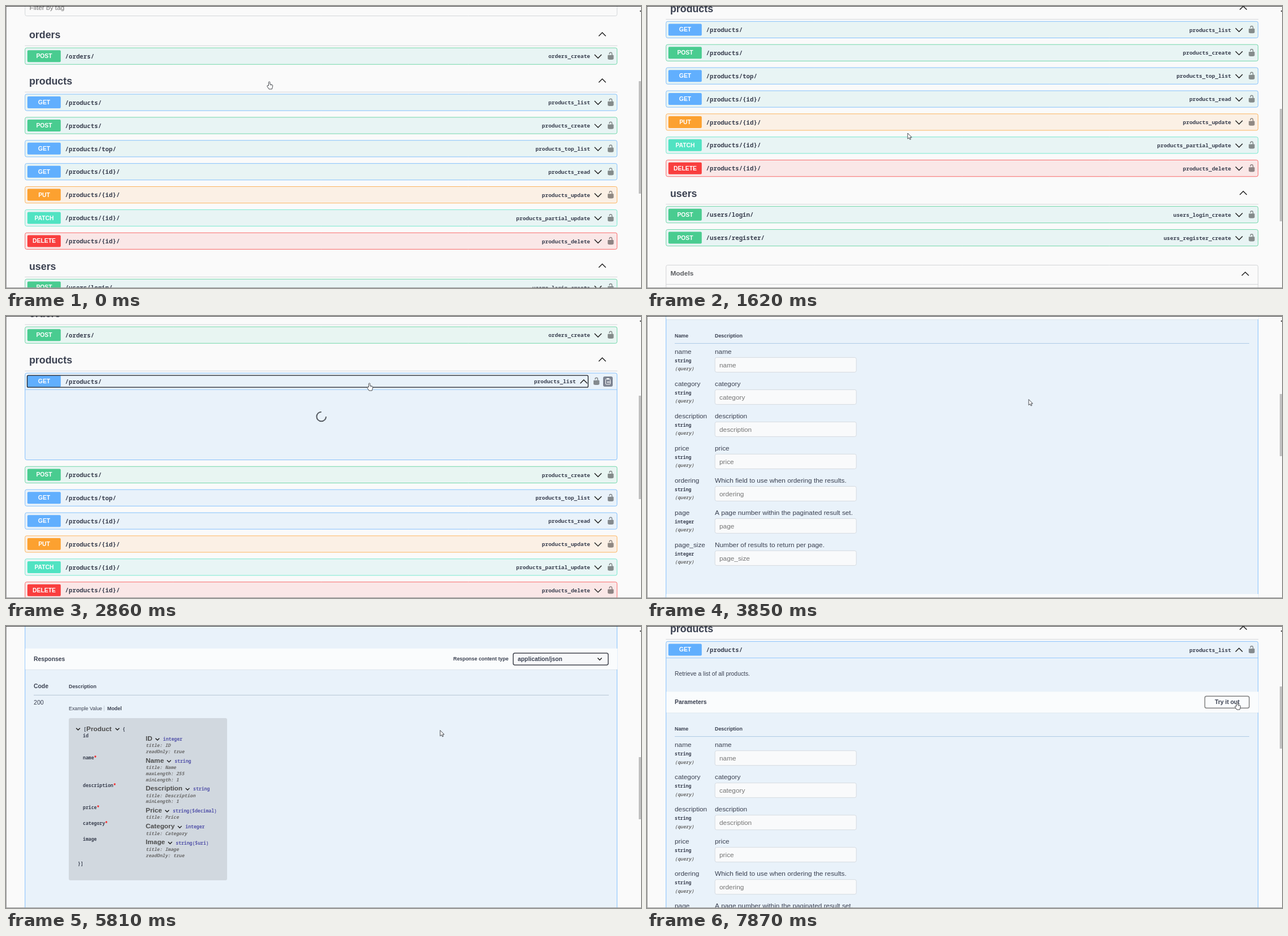
These frames come from a looping animation (1123 px wide and 499 px high, 8 s). An HTML page with a canvas:

```html
<!DOCTYPE html>
<html lang="en">
<head>
<meta charset="utf-8">
<title>API docs</title>
<style>
html, body { margin: 0; width: 100%; height: 100%; overflow: hidden; background: #fafafa; }
canvas { display: block; width: 1123px; height: 499px; }
</style>
</head>
<body>
<canvas id="stage" width="1123" height="499"></canvas>
<script>
const W = 1123, H = 499, LOOP = 8000;
const HAIR = 0.75; // one page pixel at the zoom of the stage
const ctx = document.getElementById('stage').getContext('2d');
const SANS = '"Liberation Sans", Arial, sans-serif';
const MONO = '"Noto Sans Mono", "DejaVu Sans Mono", monospace';
const INK = '#3b4151';
const COLOR = { POST: '#49cc90', GET: '#61affe', PUT: '#fca130', PATCH: '#50e3c2', DELETE: '#f93e3e' };
const TINT = { POST: '#e8f5f2', GET: '#e9f2fa', PUT: '#fbf0e5', PATCH: '#e8f5f5', DELETE: '#fae7e7' };
const SOFT = '#e8f4f4';

// Screen updates: [first, last, count]
const STEPS = [[0, 0, 1], [120, 660, 5], [810, 1110, 3], [1260, 1620, 4], [1750, 2290, 5],
  [2440, 2860, 4], [3010, 3400, 3], [3550, 3850, 3], [4280, 4700, 4], [5240, 5240, 1],
  [5360, 5960, 5], [6360, 6660, 3], [6810, 7350, 5], [7470, 7870, 4]];

const SCROLL = [[0, 0], [120, 22], [390, 112], [660, 202.5], [1110, 290], [1260, 276], [1620, 128.7],
  [2290, 55], [3400, 55], [3550, 110], [3850, 276], [4280, 300], [4700, 424], [5240, 493],
  [5960, 790], [6360, 735], [6660, 552], [7350, 240], [7740, 128.7], [8000, 128.7]];

const POINTER = [[0, 467, 140], [660, 465, 141], [1260, 465, 145], [1620, 464, 231], [2290, 475, 222],
  [2580, 610, 130], [2860, 644, 125], [3270, 646, 127], [3550, 665, 145], [4700, 715, 178], [5240, 736, 185],
  [5960, 780, 192], [6660, 888, 210], [7350, 985, 178], [7740, 1041, 145], [7870, 1045, 141], [8000, 1045, 141]];

const PRODUCTS = [
  ['GET', '/products/', 'products_list'],
  ['POST', '/products/', 'products_create'],
  ['GET', '/products/top/', 'products_top_list'],
  ['GET', '/products/{id}/', 'products_read'],
  ['PUT', '/products/{id}/', 'products_update'],
  ['PATCH', '/products/{id}/', 'products_partial_update'],
  ['DELETE', '/products/{id}/', 'products_delete']];

const PARAMS = [['name'], ['category'], ['description'], ['price'],
  ['ordering', 'Which field to use when ordering the results.'],
  ['page', 'A page number within the paginated result set.', 'integer'],
  ['page_size', 'Number of results to return per page.', 'integer']];

const FIELDS = [
  ['id', 'ID', 'integer', 'readOnly: true'],
  ['name*', 'Name', 'string', 'maxLength: 255', 'minLength: 1'],
  ['description*', 'Description', 'string', 'minLength: 1'],
  ['price*', 'Price', 'string($decimal)'],
  ['category*', 'Category', 'integer'],
  ['image', 'Image', 'string($uri)', 'readOnly: true']];

const SCHEMAS = ['DeliveryAddress', 'OrderItem', 'Order', 'Product'];

const VIEWS = {
  closed: { extra: 0, ratio: 0.38, thumb: 199 },
  loading: { extra: 124.4, ratio: 0.343, thumb: 183 },
  open: { extra: 1072, ratio: 0.2075, thumb: 110 }
};

const HAND = new Path2D('M-2.6 1 V-5.4 Q-1.4 -7.4 -.2 -5.4 V-1.6 L3.6 -.7 Q4.9 -.2 4.7 1.4 L4 4.4 L3.3 7 H-2 L-5 2.4 Q-5.6 .6 -4 .6 Z');
const ARROW = new Path2D('M-3 -6 V4.2 L-.6 2 L1 5.4 L2.6 4.6 L1.1 1.4 H4.2 Z');
const LOCK = new Path2D('M4.3 -1.5 H3 V-3.3 Q3 -6.7 0 -6.7 Q-3 -6.7 -3 -3.3 V-3 H-1.5 V-3.5 Q-1.5 -5.2 0 -5.2 Q1.5 -5.2 1.5 -3.5 V-1.5 H-4.4 Q-5.2 -1.3 -5.2 -.6 V5.2 Q-5 6.2 -2.2 6.7 H2.2 Q5 6.2 5.2 5.2 V-.6 Q5.2 -1.3 4.3 -1.5 Z');

function sample(keys, t, col = 1) {
  const i = Math.max(1, keys.findIndex(k => k[0] >= t));
  const a = keys[i - 1], b = keys[i];
  return a[col] + (b[col] - a[col]) * (t - a[0]) / (b[0] - a[0]);
}

function lastStep(t) {
  let best = 0;
  for (const [from, to, n] of STEPS)
    for (let i = 0; i < n; i++) {
      const s = n > 1 ? from + (to - from) * i / (n - 1) : from;
      if (s <= t + 0.5) best = s;
    }
  return best;
}

// y is the optical middle of the line
function text(s, x, y, size, color = INK, style = '', family = SANS, align = 'left') {
  ctx.font = `${style} ${size}px ${family}`;
  ctx.textAlign = align;
  ctx.fillStyle = color;
  ctx.fillText(s, x, y + size * 0.35);
  return ctx.measureText(s).width;
}
const bold = (s, x, y, size, color, align) => text(s, x, y, size, color, 'bold', SANS, align);
const mono = (s, x, y, size, color, style = 'bold', align) => text(s, x, y, size, color, style, MONO, align);

function box(x, y, w, h, r, fill, stroke, width = HAIR) {
  ctx.beginPath();
  ctx.roundRect(x, y, w, h, r);
  if (fill) { ctx.fillStyle = fill; ctx.fill(); }
  if (stroke) { ctx.strokeStyle = stroke; ctx.lineWidth = width; ctx.stroke(); }
}

function rule(x, y, w, color) {
  ctx.fillStyle = color;
  ctx.fillRect(x, y, w, HAIR);
}

function path(points, color, width) {
  ctx.beginPath();
  points.forEach(([x, y]) => ctx.lineTo(x, y));
  ctx.strokeStyle = color;
  ctx.lineWidth = width;
  ctx.stroke();
}

// dir: 1 points down, -1 points up
function chevron(x, y, dir, half = 6.2, width = 1.4) {
  const d = dir * half / 2;
  path([[x - half, y - d], [x, y + d], [x + half, y - d]], '#1b1b1b', width);
}

function lock(x, y) {
  ctx.save();
  ctx.translate(x, y);
  ctx.fillStyle = 'rgba(0,0,0,.43)';
  ctx.fill(LOCK);
  ctx.restore();
}

function clipboard(x, y) {
  box(x - 8.5, y - 9, 17, 18, 3, '#7d8492');
  box(x - 4, y - 4.5, 8, 9.5, 1, null, '#fff', 1);
  box(x - 2, y - 6, 4, 2.5, 0.5, '#fff');
  path([[x + 5, y + 1], [x - 1, y + 1]], '#fff', 1);
  path([[x + 1, y - 1], [x - 1, y + 1], [x + 1, y + 3]], '#fff', 1);
}

function heading(name, y) {
  bold(name, 41, y + 0.2, 17.8);
  chevron(1054.5, y - 0.8, -1);
  rule(33.3, y + 18.8, 1048, '#c9cbd0');
}

function row([method, route, id], top, view, mode = {}) {
  const mid = top + 14.7;
  const plain = view === 'closed' && 'POST GET PATCH'.includes(method);
  box(33.7, top + 0.1, 1047, 29.2 + (mode.extra || 0), 3, plain ? SOFT : TINT[method], COLOR[method]);
  box(37.8, top + 4.2, 59, 21, 2, COLOR[method]);
  bold(method, 67.5, mid - 0.1, 10.36, '#fff', 'center');
  mono(route, 104.5, mid + 0.4, 10.78);
  const shift = mode.hover ? 25.2 : 0;
  mono(id, 1033 - shift, mid + 0.4, 9.47, INK, 'bold', 'right');
  chevron(1047 - shift, mid + 0.5, mode.extra ? -1 : 1);
  lock(1069.4 - shift, mid - 0.4);
  if (mode.hover) clipboard(1064.5, mid + 0.4);
  if (mode.extra) rule(34, top + 28.9, 1047, '#7dbcfc');
  if (mode.focus) box(37.5, top + 4.3, 992, 21, 2, null, '#1c1f26', 1.3);
}

function band(y, title) {
  ctx.fillStyle = 'rgba(0,0,0,.06)';
  ctx.fillRect(34, y + 37, 1047, 1);
  ctx.fillStyle = '#fafcfd';
  ctx.fillRect(34, y, 1047, 37);
  bold(title, 49, y + 18, 10.36);
}

function parameters() {
  text('Retrieve a list of all products.', 49, 213, 10.36);
  band(245, 'Parameters');
  box(986.5, 253, 78.5, 21, 3, null, '#808080', 1.5);
  bold('Try it out', 1026, 263, 10.36, INK, 'center');
  bold('Name', 49, 310.5, 8.88);
  bold('Description', 120, 310.5, 8.88);
  rule(49, 324, 1016, '#9bbddf');
  PARAMS.forEach(([name, note = name, type = 'string'], i) => {
    const y = 339 + 57 * i;
    text(name, 49, y, 11.84);
    text(note, 120, y, 11.84);
    mono(type, 49, y + 16, 8.15);
    mono('(query)', 49, y + 30.5, 8.15, '#6b6b6b', 'italic 600');
    box(120.2, y + 10.4, 250, 26, 3, '#f9fafb', '#ccd2d8');
    text(name, 128, y + 23.5, 11.84, '#757575');
  });
}

function schema() {
  box(111, 891, 280, 287, 3, '#d1d8df');
  chevron(127.5, 910.5, 1, 3.4);
  mono('[', 137, 910.5, 8.15);
  bold('Product', 142, 909.5, 11.84, '#4c4c4c');
  chevron(197, 910.5, 1, 3.4);
  mono('{', 206, 910.5, 8.15);
  let y = 922;
  for (const [key, title, type, ...rest] of FIELDS) {
    const name = key.replace('*', '');
    const w = mono(name, 136, y, 8.15);
    if (name !== key) mono('*', 136 + w, y, 8.15, '#f00');
    const end = 247 + bold(title, 247, y + 5, 11.84, '#4c4c4c');
    chevron(end + 9, y + 6.5, 1, 3.4);
    mono(type, end + 19, y + 6.5, 8.15, '#5555aa');
    const lines = ['title: ' + title, ...rest];
    lines.forEach((s, i) => mono(s, 247, y + 17.7 + 10.7 * i, 8.15, '#6b6b6b', 'italic bold'));
    y += 17.6 + 10.6 * lines.length;
  }
  mono('}]', 127, y + 4, 8.15);
}

function responses() {
  band(768, 'Responses');
  bold('Response content type', 791, 786.5, 8.88);
  box(897, 776, 168, 21, 3, '#f7f8fa', '#41444e', 1.5);
  bold('application/json', 905, 786, 10.36);
  chevron(1050, 786.5, 1, 3.6);
  bold('Code', 49, 834.5, 10.36);
  bold('Description', 111, 835, 8.88);
  rule(49, 850, 1017, '#a6b6c7');
  text('200', 49, 863, 10.6);
  text('Example Value', 111, 874.5, 8.88);
  ctx.fillStyle = '#c3ccd6';
  ctx.fillRect(173, 869, 1, 10);
  bold('Model', 179, 874.5, 8.88);
  schema();
}

function spinner(t) {
  const a = (t - 2860) / 1000 * Math.PI * 2;
  ctx.beginPath();
  ctx.arc(557.7, 233, 8.3, a, a + Math.PI * 1.5);
  ctx.strokeStyle = '#555a61';
  ctx.lineWidth = 2;
  ctx.stroke();
}

function models() {
  box(33.7, 587.2, 1047, 320, 3, null, '#c6c8cb');
  bold('Models', 41.5, 602, 11.84, '#5a5c60');
  chevron(1058, 602.7, -1);
  rule(34, 620.7, 1047, '#c9cbce');
  SCHEMAS.forEach((name, i) => {
    const y = 636 + 58 * i;
    box(49, y, 1017, 43, 3, '#ebebeb');
    const w = bold(name, 64, y + 21.5, 11.84, '#505050');
    const x = 64 + w + 16.5;
    path([[x - 2, y + 19], [x + 1.6, y + 22.8], [x - 2, y + 26.6]], '#1b1b1b', 1.5);
  });
}

function page(t, view) {
  const { extra } = VIEWS[view];
  box(33.7, -10.5, 1047, 28, 3, '#fafafa', '#c9ccd1');
  text('Filter by tag', 41.5, 3, 11.84, '#757575');
  heading('orders', 51);
  row(['POST', '/orders/', 'orders_create'], 74, view);
  heading('products', 133);
  PRODUCTS.forEach((p, i) => {
    const top = 155.9 + 40.88 * i + (i ? extra : 0);
    row(p, top, view, i ? {} : {
      extra,
      hover: t >= 2570 && t < 3500,
      focus: t >= 2850 && t < 3500
    });
  });
  if (view === 'loading') spinner(t);
  if (view === 'open') { parameters(); responses(); }
  ctx.translate(0, extra);
  heading('users', 460.4);
  row(['POST', '/users/login/', 'users_login_create'], 483.2, view);
  row(['POST', '/users/register/', 'users_register_create'], 524.1, view);
  models();
}

function pointer(t) {
  const hand = t < 1260 || (t >= 2570 && t < 3500) || t >= 7700;
  ctx.save();
  ctx.translate(sample(POINTER, t, 1), sample(POINTER, t, 2));
  ctx.lineJoin = 'round';
  ctx.lineWidth = 0.9;
  ctx.fillStyle = '#fff';
  ctx.strokeStyle = '#33363b';
  const shape = hand ? HAND : ARROW;
  ctx.fill(shape);
  ctx.stroke(shape);
  if (hand) path([[0.9, 1.4], [0.9, -1], [2.8, -0.6], [2.8, 1.4]], '#6b6e74', 0.6);
  ctx.restore();
}

function chrome(scroll, view) {
  const { ratio, thumb } = VIEWS[view];
  ctx.fillStyle = '#c1c1c1';
  ctx.fillRect(1119, Math.round(17 + (306 + scroll) * ratio), 4, thumb);
  ctx.fillStyle = '#444';
  ctx.fillRect(1121, 8, 2, 2);
  ctx.fillStyle = '#9a9a9a';
  ctx.fillRect(0, 0, 1, H);
  ctx.fillRect(0, H - 1, W, 1);
  ctx.fillStyle = '#3a3a3a';
  ctx.fillRect(0, 0, W, 1);
}

function draw(now) {
  const t = lastStep(now % LOOP);
  const view = t < 2850 ? 'closed' : t < 3390 ? 'loading' : 'open';
  const scroll = sample(SCROLL, t);
  ctx.fillStyle = '#fafafa';
  ctx.fillRect(0, 0, W, H);
  ctx.save();
  ctx.translate(0, -scroll);
  page(t, view);
  ctx.restore();
  pointer(t);
  chrome(scroll, view);
}

const start = performance.now();
function tick() {
  draw(performance.now() - start);
  requestAnimationFrame(tick);
}
tick();
</script>
</body>
</html>
```
